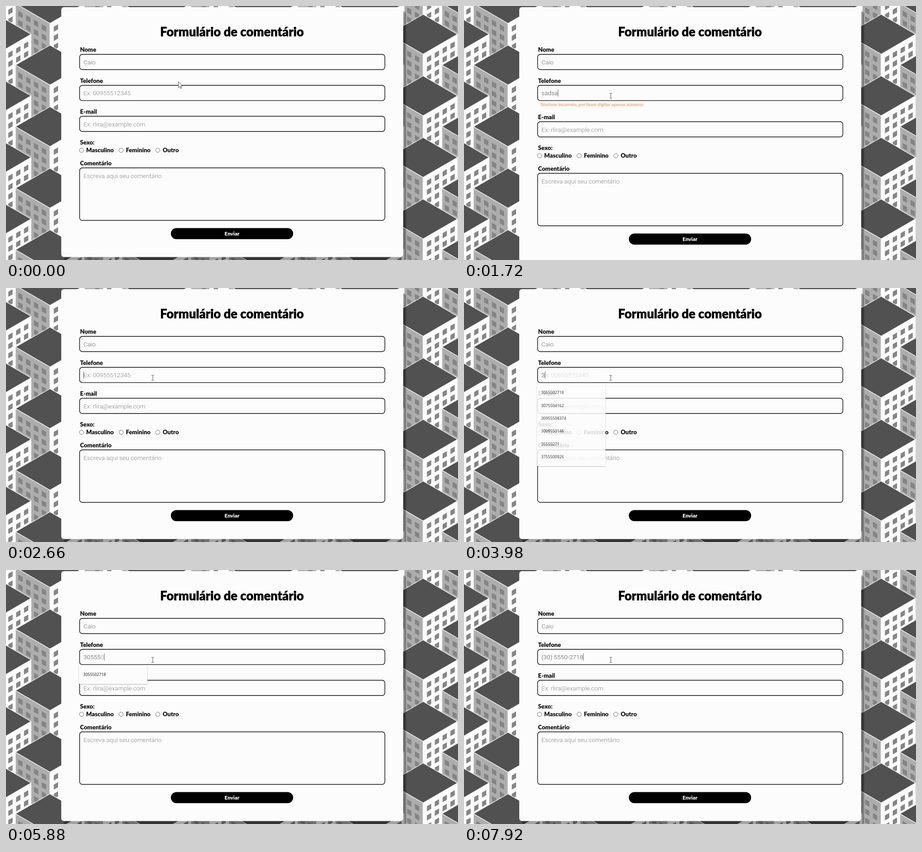
Animation, 998 px wide and 561 px high, one loop 7960 ms. Source, as an HTML page with a canvas:

```html
<!DOCTYPE html>
<html lang="pt-BR">
<head>
<meta charset="utf-8">
<title>Formulário de comentário</title>
<style>
  html, body { margin: 0; width: 100%; height: 100%; overflow: hidden; background: #fcfcfc; }
  canvas, svg { position: absolute; left: 0; top: 0; width: 998px; height: 561px; display: block; }
  text { white-space: pre; }
  .title, .label, .send { font-family: Lato, "Open Sans", sans-serif; font-weight: 900; }
  .title { font-size: 27.3px; text-anchor: middle; stroke: #000; stroke-width: .4px; stroke-linejoin: round; }
  .label { font-size: 13.1px; fill: #0c0c0c; }
  .send { font-size: 11.6px; fill: #fff; text-anchor: middle; }
  .value { font: 300 13.7px Roboto, sans-serif; fill: #505050; }
  .hint { font: 300 13.7px Roboto, sans-serif; fill: #858585; }
  .error { font: 700 9.9px Lato, sans-serif; fill: #f2b587; text-shadow: 0 0 3px #f8d3c2; }
  .option { font: 400 8.8px "Noto Sans", sans-serif; fill: #222; }
  .field { fill: #fcfcfc; stroke: #0a0a0a; stroke-width: 1.4px; }
  .radio { fill: #fff; stroke: #666; stroke-width: 1px; }
</style>
</head>
<body>
<canvas id="city" width="998" height="561"></canvas>
<svg viewBox="0 0 998 561">
  <defs>
    <filter id="soft" x="-5%" y="-5%" width="110%" height="110%"><feGaussianBlur stdDeviation=".8"/></filter>
  </defs>
  <rect id="shade" x="128" y="12" width="755" height="552" rx="6" fill="#000" opacity=".35" filter="url(#soft)"/>
  <rect id="card" x="122" y="2.5" width="755" height="552" rx="6" fill="#fcfcfc"/>

  <text class="title" x="499" y="67">Formulário de comentário</text>

  <text class="label" x="163.5" y="101.3">Nome</text>
  <rect class="field" x="162.5" y="106.8" width="674" height="33.7" rx="6"/>
  <text class="hint" x="171" y="129" style="fill:#6c6c6c">Caio</text>

  <text class="label" x="163.5" y="169.5">Telefone</text>
  <rect class="field" x="162.5" y="175.2" width="674" height="33.7" rx="6"/>
  <text class="hint" id="hint" x="171" y="197">Ex: 00955512345</text>
  <text class="value" id="value" x="171" y="197"><tspan id="head"></tspan><tspan id="tail"></tspan></text>
  <rect id="caret" y="184" width="1" height="16" fill="#666"/>
  <text class="error" id="error" x="168" y="221">Telefone incorreto, por favor digitar apenas números</text>

  <g id="lower">
    <text class="label" x="163.5" y="237.8">E-mail</text>
    <rect class="field" x="162.5" y="243.5" width="674" height="33.7" rx="6"/>
    <text class="hint" x="171" y="265.5">Ex: rlira@example.com</text>

    <text class="label" x="163.5" y="306">Sexo:</text>
    <circle class="radio" cx="166.8" cy="318.7" r="4.7"/>
    <text class="label" x="177" y="323.3">Masculino</text>
    <circle class="radio" cx="254.2" cy="318.7" r="4.7"/>
    <text class="label" x="264.7" y="323.3">Feminino</text>
    <circle class="radio" cx="335.2" cy="318.7" r="4.7"/>
    <text class="label" x="346" y="323.3">Outro</text>

    <text class="label" x="163.5" y="351.7">Comentário</text>
    <rect class="field" x="162.5" y="357.5" width="674" height="116" rx="6"/>
    <text class="hint" x="171" y="379.5">Escreva aqui seu comentário</text>

    <rect x="364" y="490.5" width="270" height="24.5" rx="12.25"/>
    <text class="send" x="499" y="507">Enviar</text>
  </g>

  <g id="lists"></g>

  <path id="arrow" d="M0 0V13L3.1 10.2L5.2 15L7.3 14L5.2 9.4H9.2Z" fill="#fff" stroke="#444" stroke-width="1" stroke-linejoin="round"/>
  <path id="beam" d="M-3 -5.5H-.7L0 -5L.7 -5.5H3M0 -5V5M-3 5.5H-.7L0 5L.7 5.5H3" fill="none" stroke="#666" stroke-width="1.1"/>
</svg>
<script>
const LOOP = 7960;
const $ = id => document.getElementById(id);
const ramp = (t, a, b) => Math.min(1, Math.max(0, (t - a) / (b - a)));
const within = (t, spans) => spans.some(([a, b]) => t >= a && t < b);

// ---- city backdrop: isometric blocks, far rows first
function drawCity() {
  const c = $('city').getContext('2d');
  const W = 76, H = 44, DEPTH = 190, PITCH = 17.3, FLOOR = 20.2;

  function wall(x, y, side, paint, glass) {
    c.save();
    c.transform(side, -H / W, 0, 1, x, y);
    c.fillStyle = paint;
    c.fillRect(0, 0, W, DEPTH);
    c.strokeRect(0, 0, W, DEPTH);
    c.fillStyle = glass;
    for (let u = 8.5; u < W - 8; u += PITCH)
      for (let v = 12.3; v < DEPTH; v += FLOOR) c.fillRect(u, v, 9.5, 11.3);
    c.restore();
  }

  function block(x, y) {
    wall(x, y + H, -1, '#adadad', '#848484');
    wall(x, y + H, 1, '#fcfcfc', '#858585');
    c.beginPath();
    c.moveTo(x, y - H);
    c.lineTo(x + W, y);
    c.lineTo(x, y + H);
    c.lineTo(x - W, y);
    c.closePath();
    c.fillStyle = '#515151';
    c.fill();
    c.stroke();
  }

  c.fillStyle = '#adadad';
  c.fillRect(0, 0, 998, 561);
  c.strokeStyle = '#f2f2f2';
  c.lineWidth = 1.3;
  for (let row = -5; row < 9; row++)
    for (let col = -2; col < 10; col++)
      if ((row + col) % 2 === 0) block(97 + col * 117.7, 130.4 + row * 68);
}

// ---- suggestion lists
const numbers = ['3055502718', '3075504162', '30955508374', '3099550146', '35550271', '3755500926'];
const starting = p => numbers.filter(n => n.startsWith(p));

// fade in from a to b, fade out from c to d
const lists = [
  { items: ['sssdadas'], a: 2430, b: 2535, c: 2560, d: 2640 },
  { items: starting('305'), a: 5000, b: 5001, c: 6740, d: 6860 },
  { items: starting('30'), a: 4720, b: 4721, c: 5000, d: 5160 },
  { items: starting('3'), a: 3860, b: 4000, c: 4720, d: 4860 }
];

function make(tag, attrs, parent) {
  const el = document.createElementNS('http://www.w3.org/2000/svg', tag);
  for (const k in attrs) el.setAttribute(k, attrs[k]);
  return parent.appendChild(el);
}

for (const list of lists) {
  const g = list.el = make('g', {}, $('lists'));
  const box = { x: 161, y: 212, width: 151.3, height: 11.5 + 28.35 * list.items.length, rx: 2 };
  make('rect', { ...box, y: 213, fill: '#000', opacity: .3, filter: 'url(#soft)' }, g);
  make('rect', { ...box, fill: '#fcfcfc' }, g);
  list.items.forEach((item, i) => {
    make('text', { class: 'option', x: 170.3, y: 234.4 + 28.35 * i }, g).textContent = item;
  });
}

// ---- typing
const typing = [
  [0, ''], [200, 's'], [250, 'sa'], [300, 'sad'], [350, 'sads'], [400, 'sadsa'], [440, 'sadsad'],
  [1720, 'sadsa'], [1860, 'sads'], [2020, 'sad'], [2220, 'sa'], [2380, 's'], [2600, ''],
  [3840, '3'], [4720, '30'], [5000, '305'], [5100, '3055'], [5340, '30555'], [5880, '305550'],
  [6180, '3055502'], [6340, '30555027'], [6620, '305550271'], [6740, '(30) 5550-2718']
];
const caretOn = [[180, 1000], [1500, 2380], [2620, 3120], [3660, 4520], [4720, 7380], [7920, LOOP]];
const invalid = [[220, 2600]];

function render(t) {
  const i = typing.findLastIndex(k => k[0] <= t);
  const [since, value] = typing[i];
  const before = i ? typing[i - 1][1] : '';
  const fresh = value.length === before.length + 1 && t - since < 20;

  $('head').textContent = value.slice(0, -1);
  $('tail').textContent = value.slice(-1);
  $('tail').style.fillOpacity = fresh ? .6 : 1;

  const width = value ? $('value').getComputedTextLength() : 0;
  $('caret').setAttribute('x', 171 + width);
  $('caret').style.opacity = within(t, caretOn) ? 1 : 0;

  const ghost = t >= 3840 && t < 4020 ? 1 - ramp(t, 3900, 4020) : 0;
  $('hint').style.opacity = value ? ghost : 1;

  const bad = within(t, invalid);
  const shift = bad ? 12 : 0;
  $('error').style.opacity = bad ? ramp(t, 220, 440) : 0;
  $('lower').setAttribute('transform', `translate(0 ${shift})`);
  $('card').setAttribute('height', 552 + shift);
  $('shade').setAttribute('height', 552 + shift);

  for (const { el, a, b, c, d } of lists)
    el.style.opacity = ramp(t, a, b) * (1 - ramp(t, c, d));

  const p = ramp(t, 0, 160);
  const x = 381 - 57 * p, y = 167 + 31.5 * p;
  const pointing = y < 175;
  $('arrow').setAttribute('transform', `translate(${x} ${y})`);
  $('beam').setAttribute('transform', `translate(${x} ${y})`);
  $('arrow').style.opacity = pointing ? 1 : 0;
  $('beam').style.opacity = pointing ? 0 : 1;
}

drawCity();
render(0);
const start = performance.now();
requestAnimationFrame(function tick() {
  render((performance.now() - start) % LOOP);
  requestAnimationFrame(tick);
});
</script>
</body>
</html>
```
